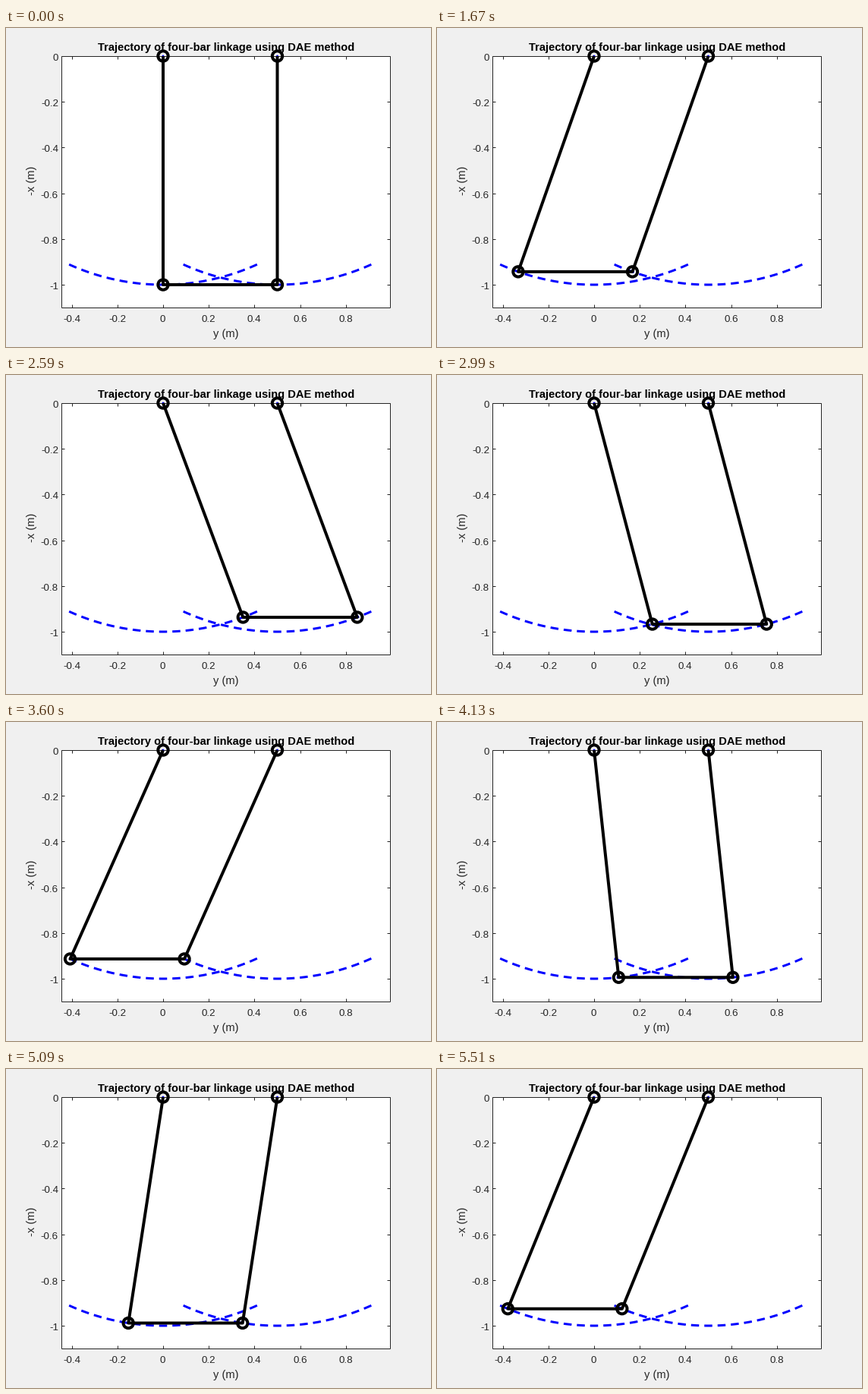
A matplotlib script for the animation above (5580 ms loop, 560 by 420 pixels).

```python
import numpy as np
import matplotlib.pyplot as plt
from matplotlib.animation import FuncAnimation
from matplotlib.collections import LineCollection
from matplotlib.patches import Circle, Rectangle

W, H, DPI = 560, 420, 80
PX = 72 / DPI                      # one pixel in points
LOOP, STEP = 5580, 10              # ms
REST, PAUSE = 600, 1670            # still start, then one long-held pose
SCALE, X0, Y0 = 301, 207, 37       # metres to pixels
SPAN, SWING = 0.5, 0.42            # pin distance (m), amplitude (rad)
LEFT, RIGHT, TOP, BOTTOM = 73, 506, 37, 368
INK = "#262626"

plt.rcParams["font.family"] = "Liberation Sans"


def to_px(x, y):
    return X0 + SCALE * np.asarray(x), Y0 - SCALE * np.asarray(y)


def swing_angle(t):
    """Pendulum angle at t ms; poses advance in steps of about 67 ms."""
    if t < REST:
        return 0
    n = -1 if t < PAUSE else max(0, (t - PAUSE - 30) // 66.8)
    return SWING * np.sin(4.08 + 0.2505 * n - 0.00021 * n**2)


fig = plt.figure(figsize=(W / DPI, H / DPI), dpi=DPI, facecolor="#f0f0f0")
ax = fig.add_axes([0, 0, 1, 1])
ax.set(xlim=(0, W), ylim=(H, 0))
ax.axis("off")


def label(x, y, text, size, **style):
    style = {"ha": "center", "va": "baseline", "color": INK, **style}
    ax.text(x, y, text, fontsize=size * PX, **style)


# Plot box, ticks and labels
ax.add_patch(Rectangle((LEFT, TOP), RIGHT - LEFT, BOTTOM - TOP,
                       facecolor="white", edgecolor="none", zorder=0))
rules = [[(LEFT, TOP), (RIGHT, TOP)], [(LEFT, BOTTOM), (RIGHT, BOTTOM)],
         [(LEFT, TOP), (LEFT, BOTTOM)], [(RIGHT, TOP), (RIGHT, BOTTOM)]]
for n in range(-2, 5):
    x = np.round(to_px(n / 5, 0)[0])
    rules += [[(x, BOTTOM), (x, BOTTOM - 4)], [(x, TOP), (x, TOP + 4)]]
    label(x - 0.5, 387, f"{n / 5:g}", 13.33)
for n in range(6):
    y = np.round(to_px(0, -n / 5)[1])
    rules += [[(LEFT, y), (LEFT + 4, y)], [(RIGHT, y), (RIGHT - 4, y)]]
    label(69, y + 5.9, f"{-n / 5:g}" if n else "0", 13.33, ha="right")
ax.add_collection(LineCollection(rules, colors=INK, linewidths=PX,
                                 zorder=1, snap=True))
label(290, 30, "Trajectory of four-bar linkage using DAE method", 14.67,
      weight="bold", color="black")
label(290, 407, "y (m)", 14.67)
label(38, 201, "-x (m)", 14.67, rotation=90, rotation_mode="anchor")

# Dashed paths of the lower joints, and the still pins
REACH, DASHES, DASH, WIDTH = 0.424, 15, 10.5, 3
gap = (2 * REACH * SCALE - DASHES * DASH) / (DASHES - 1)
sweep = np.linspace(-REACH, REACH, 120)
for pin in (0, SPAN):
    ax.plot(*to_px(pin + np.sin(sweep), -np.cos(sweep)), color="blue",
            lw=WIDTH * PX, dashes=(DASH / WIDTH, gap / WIDTH),
            dash_capstyle="butt", zorder=2)
    ax.add_patch(Circle(to_px(pin, 0), 1.4, color="blue", lw=0, zorder=2))

bars, = ax.plot([], [], color="black", lw=4 * PX, solid_capstyle="butt",
                solid_joinstyle="round", snap=False, zorder=4)
joints = [ax.add_patch(Circle((0, 0), 6.67, fill=False, ec="black",
                              lw=4 * PX, zorder=5)) for _ in range(4)]


def draw(frame):
    angle = swing_angle(frame * STEP)
    x, y = np.sin(angle), -np.cos(angle)
    xs, ys = to_px([0, x, x + SPAN, SPAN], [0, y, y, 0])
    bars.set_data(xs, ys)
    for joint, center in zip(joints, zip(xs, ys)):
        joint.center = center
    return bars, *joints


anim = FuncAnimation(fig, draw, frames=LOOP // STEP, interval=STEP,
                     init_func=lambda: draw(0), repeat=True, repeat_delay=0)
plt.show()
```
